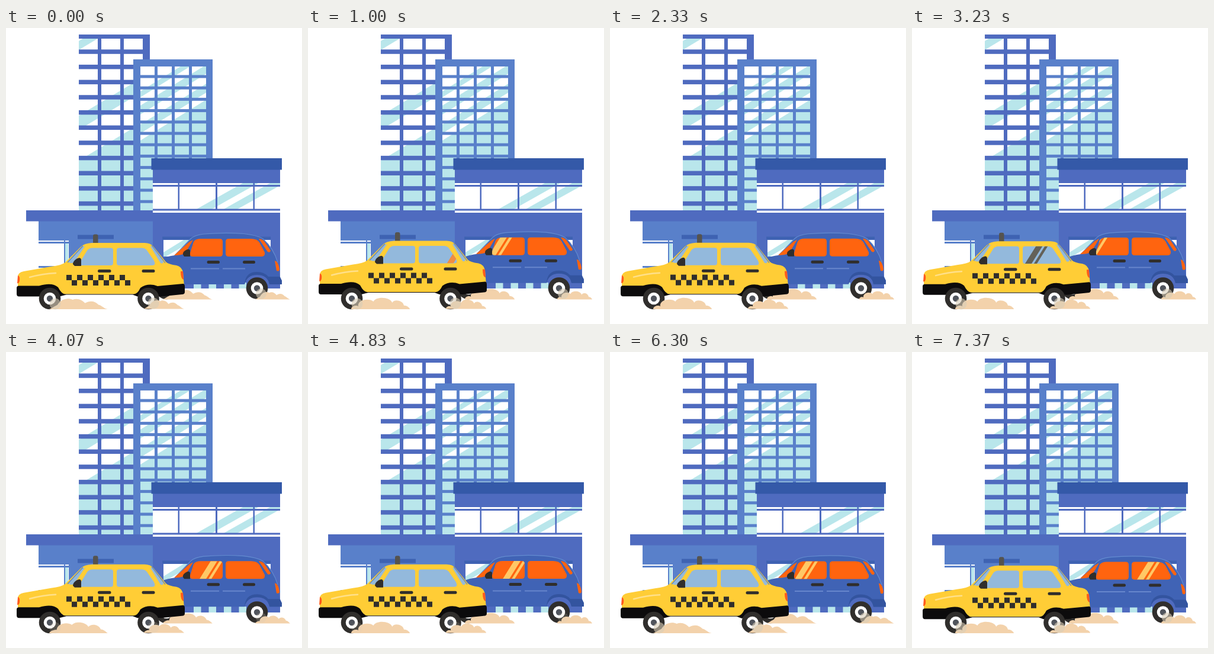
These frames come from a looping animation (500x500 px, 7430 ms). An HTML page:

```html
<!DOCTYPE html>
<html lang="en">
<head>
<meta charset="utf-8">
<title>City taxi</title>
<style>
  html, body { margin: 0; width: 100%; height: 100%; overflow: hidden; background: #fff; }
  svg { display: block; width: 100vw; height: 100vh; }
</style>
</head>
<body>
<svg viewBox="0 0 500 500">
  <defs>
    <clipPath id="glassA"><path d="M123 18H231V308H123Z"/></clipPath>
    <clipPath id="glassB"><path d="M227 65H338V308H227Z"/></clipPath>
    <clipPath id="glassC"><path d="M248 262H463V312H248Z"/></clipPath>
    <clipPath id="blueFront"><path id="bf" d="M314 386Q310 385 311 380L317 361Q320 356 329 356H361Q366 356 366 361V381Q366 386 361 386Z"/></clipPath>
    <clipPath id="blueRear"><path id="br" d="M376 386Q371 386 371 381V361Q371 356 376 356H414Q424 356 428 362L437 379Q438 386 432 386Z"/></clipPath>
    <clipPath id="taxiFront"><path id="tf" d="M128 401Q123 401 126 394L137 376Q140 371.500 146 371.500H177Q181 371.500 181 375.500V397Q181 401 177 401Z"/></clipPath>
    <clipPath id="taxiRear"><path id="tr" d="M191 401Q187 401 187 397V375.500Q187 371.500 191 371.500H229Q235 371.500 238 375.500L250 393Q254 401 247 401Z"/></clipPath>
    <path id="shine" d="M0 32L20 0H31L11 32ZM15 32L35 0H40L20 32Z"/>
    <g id="wheel">
      <circle r="18.3" fill="#302e2c"/>
      <circle r="10.3" fill="#fff"/>
      <circle r="5.2" fill="#50545c"/>
    </g>
  </defs>

  <!-- Tall tower -->
  <path d="M123 11H243V308H123Z" fill="#4f6bbf"/>
  <g id="towerA"></g>

  <!-- Front tower -->
  <path d="M215 53H349V308H215Z" fill="#5980ca"/>
  <g id="towerB"></g>

  <!-- Left wing -->
  <path d="M55 326H248V359H55ZM106 359H248V440H106Z" fill="#5980ca"/>
  <path d="M55 361H106V364H55ZM98 359H100V405H98ZM55 402H98V405H55Z" fill="#5980ca"/>
  <path d="M100 364H105V405H100Z" fill="#b9e6eb"/>
  <path d="M34 308H248V326.5H34Z" fill="#4f6bbf"/>
  <path d="M121 349.500H182V356.500H121Z" fill="#3e62b2"/>

  <!-- Right hall -->
  <path d="M248 239H463V440H248Z" fill="#4f6bbf"/>
  <path d="M248 262H463V312H248Z" fill="#fff"/>
  <path clip-path="url(#glassC)" d="M320 307L400 262H426L346 307ZM366 307L446 262H470L389 307Z" fill="#b9e6eb"/>
  <path d="M248 265H463V268H248ZM248 305.500H463V308.500H248ZM290.500 262H293V308H290.500ZM354 262H357V308H354ZM417.500 262H420V308H417.500Z" fill="#4f6bbf"/>
  <path d="M245.500 220H466V239.500H245.500Z" fill="#3459a8"/>
  <path d="M266 358H447V386H266Z" fill="#fff"/>
  <path d="M266 379L300 358H318L270 386H266Z" fill="#b9e6eb"/>
  <path d="M264 352.500H447V357.500H264Z" fill="#3e62b2"/>
  <g id="base"></g>

  <!-- Blue car -->
  <use href="#wheel" x="271" y="440"/>
  <g id="blue">
    <path d="M252 433V397Q258 388 285 384L312 356Q318 350 334 348.500Q370 345.500 402 348Q424 350 434 356Q452 372 459 396L462 418L466 427V433H445Q442 417 424 417Q407 417 403 433Z" fill="#4063b5"/>
    <path d="M285 384L312 356Q318 350 334 348Q370 345 402 347.500Q424 350 434 356Q452 372 459 396" fill="none" stroke="#638bd0" stroke-width="1.200"/>
    <path d="M403 433Q404 412 424 412Q436 412 443 420H462L466 427V433H445Q442 417 424 417Q407 417 403 433Z" fill="#33549f"/>
    <path d="M284 384L310 361L316 358L303 380Q298 384 284 384ZM427 356Q432 356 436 360L447 376Q446 380 442 378Z" fill="#ff640f"/>
    <use href="#bf" fill="#ff640f"/>
    <use href="#br" fill="#ff640f"/>
    <g clip-path="url(#blueFront)"><use id="shineBF" href="#shine" y="355" fill="#ffc866"/></g>
    <g clip-path="url(#blueRear)"><use id="shineBR" href="#shine" y="355" fill="#ffc866"/></g>
    <path d="M299 383Q298 378 304 375Q310 372 311 376V386H301Z" fill="#302e2c"/>
    <path d="M342 395.500H358.500M402.500 395.500H418.500" stroke="#302e2c" stroke-width="5" stroke-linecap="round"/>
    <path d="M312 406.500H360M366 406.500H404" stroke="#6786cc" stroke-width="2"/>
    <path d="M454 393Q460 394 462 408Q461 412 457 410Z" fill="#ff640f"/>
  </g>
  <use href="#wheel" x="424" y="439.500"/>
  <path class="puff" data-box="265 441 84 17.500"/>
  <path class="puff" data-box="421 445 59 13.500"/>
  <circle class="haze" cx="431" cy="449" r="9"/>

  <!-- Taxi -->
  <g id="taxi">
    <rect x="147" y="348.500" width="8.500" height="18" rx="3" fill="#55534f"/>
    <path d="M20 437V420Q20 413 30 411L76 403Q94 401 100 396L126 370Q132 363.500 145 363H234Q244 363 249 369L270 395Q274 399 288 401Q297 403 299 413L301 437L224 449.500H94Z" fill="#ffcd36"/>
    <path d="M105 395L126 372Q130 368 133 369L115 396Q109 399 105 395ZM244 369Q248 368 251 372L266 395Q265 399 261 397Z" fill="#93b9dc"/>
    <path d="M104 396L130 368M246 367L269 397" stroke="#5b83bd" stroke-width="1.200"/>
    <use href="#tf" fill="#93b9dc"/>
    <use href="#tr" fill="#93b9dc"/>
    <g clip-path="url(#taxiFront)"><use id="shineTF" href="#shine" y="370" fill="#636158"/></g>
    <g clip-path="url(#taxiRear)"><use id="shineTR" href="#shine" y="370"/></g>
    <path d="M113 399Q113 394 119 390Q126 386 127 391V402H116Z" fill="#302e2c"/>
    <path d="M157.500 410.500H175M232 410.500H249" stroke="#302e2c" stroke-width="5" stroke-linecap="round"/>
    <path d="M40 421Q62 415 84 414" fill="none" stroke="#ffe08a" stroke-width="2.500" stroke-linecap="round"/>
    <g id="checks" fill="#302e2c"></g>
    <path d="M20 418Q24 419 23 427Q22 432 19 431ZM295 411H299L300 425Q295 424 295 411Z" fill="#ff5a1c"/>
    <path d="M18 439Q18 435.500 22 435.500L56 435.500Q78 429 88 438Q94 449.500 100 449.500H216Q222 449.500 227 439Q240 430 256 436L299 432Q302 432 302 437V446Q302 450 297 450L262 453.500H222L214 450.500H102L90 453.500H22Q18 453.500 18 449Z" fill="#0c0b0c"/>
  </g>
  <use href="#wheel" x="74" y="457"/>
  <use href="#wheel" x="240.500" y="457"/>
  <path class="puff" data-box="73 456 99 19"/>
  <path class="puff" data-box="233 459 68 15.500"/>
  <circle class="haze" cx="83" cy="466" r="9.500"/>
  <circle class="haze" cx="249" cy="465" r="9.500"/>
</svg>

<script>
const LOOP = 7430, BEAT = 755, DRIFT = 2100;
const $ = id => document.getElementById(id);
const rect = (x, y, w, h, fill) =>
  `<rect x="${x}" y="${y}" width="${w}" height="${h}" fill="${fill}"/>`;

// White glass, rising bands [top, bottom] at the left edge, then mullions.
function glass(id, clip, [x, y, w, h], slope, bands, cols, rows, color) {
  let s = rect(x, y, w, h, "#fff");
  for (const [a, b] of bands) {
    s += `<path fill="#b9e6eb" d="M${x} ${a}L${x + w} ${a - w * slope}V${b - w * slope}L${x} ${b}Z"/>`;
  }
  for (const c of cols.at) s += rect(c, y, cols.size, h, color);
  for (let r = rows.from; r < y + h; r += rows.step) s += rect(x, r, w, rows.size, color);
  $(id).innerHTML = `<g clip-path="url(#${clip})">${s}</g>`;
}

glass("towerA", "glassA", [123, 18, 108, 290], 0.6,
  [[22, 37], [148, 172], [224, 400]],
  { at: [155, 193], size: 6 }, { from: 36.3, step: 25.65, size: 7.5 }, "#4f6bbf");
glass("towerB", "glassB", [227, 65, 111, 243], 0.62,
  [[107, 117], [131, 146], [163, 178], [190, 400]],
  { at: [251, 280, 309], size: 5 }, { from: 79.5, step: 19.2, size: 5 }, "#5980ca");

let base = "";
for (let x = 317; x < 400; x += 25.5) base += rect(x, 430, 12.5, 10, "#b9e6eb");
$("base").innerHTML = base;

let checks = "";
for (let i = 0; i < 12; i++) checks += rect(102 + i * 9, i % 2 ? 426 : 417, 9, 9, "#302e2c");
$("checks").innerHTML = checks;

// Dust outlines in a unit box, one cubic arch after another.
const lumpy = [0, 1, 0, .7, .1, .62, .12, .75, .1, .1, .32, 0, .38, .32,
  .42, -.15, .66, -.12, .7, .42, .72, .1, .88, .15, .9, .68, .95, .65, 1, .9, 1, 1];
const smooth = [0, 1, .03, .95, .09, .75, .14, .62, .2, .1, .32, -.05, .4, .16,
  .48, -.02, .56, .16, .61, .46, .7, .2, .78, .28, .84, .6, .9, .66, .93, .95, 1, 1];

function puffPath([x, y, w, h], mix) {
  const n = lumpy.map((v, i) => {
    const u = v + (smooth[i] - v) * mix;
    return (i % 2 ? y + u * h : x + u * w).toFixed(2);
  });
  return `M${n[0]} ${n[1]}C${n.slice(2).join(" ")}Z`;
}

const puffs = [...document.querySelectorAll(".puff")].map(el => {
  el.setAttribute("fill", "#f3d2ab");
  return { el, box: el.dataset.box.split(" ").map(Number) };
});
const hazes = [...document.querySelectorAll(".haze")];
hazes.forEach(el => el.setAttribute("fill", "#d9cdb8"));

const move = (id, x, y) => $(id).setAttribute("transform", `translate(${x.toFixed(2)} ${y.toFixed(2)})`);
const near = (p, at, width) => Math.max(0, 1 - Math.abs(p - at) / width);

function draw(now) {
  const t = now % LOOP, p = t % BEAT;
  const lift = (1 - Math.cos(p / BEAT * 2 * Math.PI)) / 2;
  move("taxi", 0, -4.8 * lift);
  move("blue", 0, -3.2 * lift);

  move("shineBF", 305 + (p - 245) * .42, 0);
  move("shineBR", 379 + (p - 575) * .42, 0);
  move("shineTF", 126 + (p - 650), 0);
  move("shineTR", 189 + (p - 210) * 1.25, 0);
  $("shineTR").setAttribute("fill", p < 228 ? "#636158" : "#f08c42");

  const d = t % DRIFT;
  const mix = Math.max(near(d, 0, 200), near(d, DRIFT, 200));
  for (const { el, box } of puffs) el.setAttribute("d", puffPath(box, mix));
  const haze = .6 * (1 - Math.max(near(p, 65, 50), near(p, 315, 50)));
  for (const el of hazes) el.setAttribute("opacity", haze.toFixed(2));
}

const start = performance.now();
function tick() {
  draw(performance.now() - start);
  requestAnimationFrame(tick);
}
tick();
</script>
</body>
</html>
```
